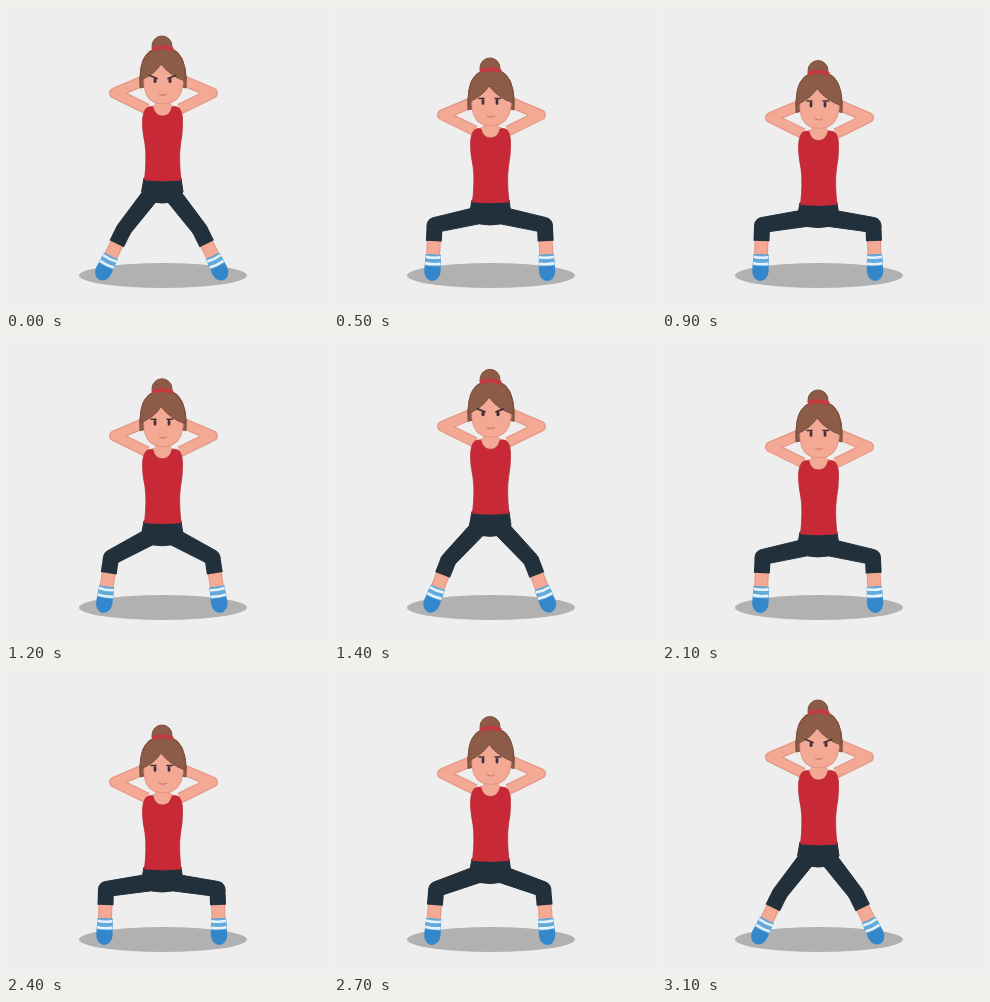
Animation of 322 by 304 pixels, one loop 3.2 s. Source, as an HTML page:

```html
<!DOCTYPE html>
<html lang="en">
<head>
<meta charset="utf-8">
<title>Squat</title>
<style>
  html, body { margin: 0; width: 100%; height: 100%; overflow: hidden; background: #eee; }
  svg { display: block; width: 322px; height: 304px; }
  path, line { stroke-linejoin: round; }
  .line { fill: none; }
  .skin { fill: #f3a994; stroke: #e39482; stroke-width: 1; }
  .hair { fill: #8c5c48; stroke: #7d4f3e; stroke-width: 1; }
  .pants { fill: #22303b; stroke: #22303b; stroke-width: 1; }
  .face-mark { fill: none; stroke: #40303a; stroke-linecap: round; }
</style>
</head>
<body>
<svg viewBox="0 0 322 304">
  <rect width="322" height="304" fill="#eee"/>
  <ellipse cx="157" cy="269.5" rx="84" ry="12.5" fill="#b1b1b1"/>

  <defs>
    <g id="leg">
      <path class="line calf" stroke="#e39482" stroke-width="14"/>
      <path class="line calf" stroke="#f3a994" stroke-width="12"/>
      <g id="foot">
        <path d="M-7.5 -14.5H7.5L8.2 2A8.2 10 0 0 1 -8.2 2Z" fill="#3487cb"/>
        <path d="M-7.5 -14.5H7.5L7.8 -3H-7.8Z" fill="#62a9dc"/>
        <path class="line" d="M-7.5 -12Q0 -10.500 7.500 -12M-7.700 -5.500Q0 -4 7.700 -5.500" stroke="#e6f2fa" stroke-width="2.600"/>
      </g>
      <path class="line trouser" stroke="#22303b" stroke-width="16"/>
      <path class="pants" id="thigh"/>
    </g>
    <g id="arm">
      <path class="line" d="M138 74.500L108.500 87L141 103" stroke="#e39482" stroke-width="11"/>
      <path class="line" d="M138 74.500L108.500 87L141 103" stroke="#f3a994" stroke-width="8.800"/>
    </g>
  </defs>

  <use href="#leg"/>
  <use href="#leg" transform="translate(311.5) scale(-1 1)"/>

  <g id="upper">
    <path class="pants" d="M138 172H175L177 186L166 196Q156 198 146 196L135.500 186Z"/>
    <use href="#arm"/>
    <use href="#arm" transform="translate(315) scale(-1 1)"/>
    <path class="skin" d="M150 92V99L141 102L147 115H167L173 102L164 99V92Z"/>
    <path d="M140.500 102Q144 100 147 101Q149 110 156.500 110Q164 110 166 101Q170 100 173 102Q177 106 176.500 118Q176.500 128 174.500 138Q172.500 152 175 174Q156 176 138.500 174Q141 152 139 138Q136.500 126 136.500 117Q136.500 106 140.500 102Z"
      fill="#c82936" stroke="#b92e39" stroke-width=".8"/>

    <circle class="hair" cx="156" cy="40" r="10"/>
    <path class="hair" d="M134 82Q133 72 135 62Q139 41 157 41Q175 41 179 62Q181 72 180 82L176 81V65H138V81Z"/>
    <path class="skin" d="M138 66Q139 52 157 52Q176 52 177 66V78Q175 98 157 98Q139 98 138 78Z"/>
    <path class="hair" d="M135 74Q132 43 157 42Q181 43 179 75Q164 70 155 58Q149 68 135 74Z"/>
    <path class="line" d="M146 43.500Q156 39 167 43.500" stroke="#c33a41" stroke-width="4"/>
    <path class="line" d="M153 88Q157 90.500 161 88" stroke="#d9806f" stroke-width="1.300"/>
    <g id="strained" class="face-mark">
      <path d="M143.500 69.500L151 72.500M169.500 69.500L162 72.500" stroke-width="1.700"/>
      <path d="M149 73.500V75.500M164 73.500V75.500" stroke-width="3"/>
    </g>
    <g id="relaxed" class="face-mark">
      <path d="M145 70.500H150M161 70.500H166.500" stroke-width="1.600"/>
      <path d="M149 72.500V75.500M163 72.500V75.500" stroke-width="2.700"/>
    </g>
  </g>
</svg>
<script>
const STEP = 100, CYCLE = 1600, DROP = 25;
const THIGH = 47.5, SHIN = 44, CUFF = 28;
const FOOT = { x: 98.5, y: 263 };
const $ = id => document.getElementById(id);
const smooth = (a, b, t) => {
  const u = Math.min(1, Math.max(0, (t - a) / (b - a)));
  return u * u * (3 - 2 * u);
};
const depthAt = t => smooth(0, 640, t) - smooth(850, 1490, t);
const setPath = (name, d) =>
  document.querySelectorAll('.' + name).forEach(el => el.setAttribute('d', d));

// Thigh and shin meet at a knee bent outwards.
function findKnee(hip) {
  const dx = FOOT.x - hip.x, dy = FOOT.y - hip.y, dist = Math.hypot(dx, dy);
  const along = (dist * dist + THIGH * THIGH - SHIN * SHIN) / (2 * dist);
  const bend = Math.sqrt(Math.max(0, THIGH * THIGH - along * along));
  return {
    x: hip.x + (dx * along - dy * bend) / dist,
    y: hip.y + (dy * along + dx * bend) / dist
  };
}

// Tapered capsule from hip to knee.
function thighPath(a, b, ra, rb) {
  const len = Math.hypot(b.x - a.x, b.y - a.y);
  const nx = -(b.y - a.y) / len, ny = (b.x - a.x) / len;
  const at = (p, r) => `${p.x + nx * r} ${p.y + ny * r}`;
  return `M${at(a, ra)}L${at(b, rb)}A${rb} ${rb} 0 0 0 ${at(b, -rb)}L${at(a, -ra)}Z`;
}

function draw(now) {
  const depth = depthAt(Math.floor(now / STEP) * STEP % CYCLE);
  const hip = { x: 147, y: 186 + (DROP + 1) * depth };
  const knee = findKnee(hip);
  const dx = FOOT.x - knee.x, dy = FOOT.y - knee.y;
  const cuff = 1 - CUFF / SHIN;

  setPath('calf', `M${knee.x} ${knee.y}L${FOOT.x} ${FOOT.y}`);
  setPath('trouser', `M${knee.x} ${knee.y}L${knee.x + dx * cuff} ${knee.y + dy * cuff}`);
  $('thigh').setAttribute('d', thighPath(hip, knee, 8.5, 7.5));
  const turn = Math.atan2(-dx, dy) * 180 / Math.PI;
  $('foot').setAttribute('transform', `translate(${FOOT.x} ${FOOT.y}) rotate(${turn})`);
  $('upper').setAttribute('transform', `translate(0 ${DROP * depth})`);
  $('strained').style.display = depth < 0.15 ? '' : 'none';
  $('relaxed').style.display = depth < 0.15 ? 'none' : '';
}

function tick() {
  draw(performance.now());
  requestAnimationFrame(tick);
}
tick();
</script>
</body>
</html>
```
